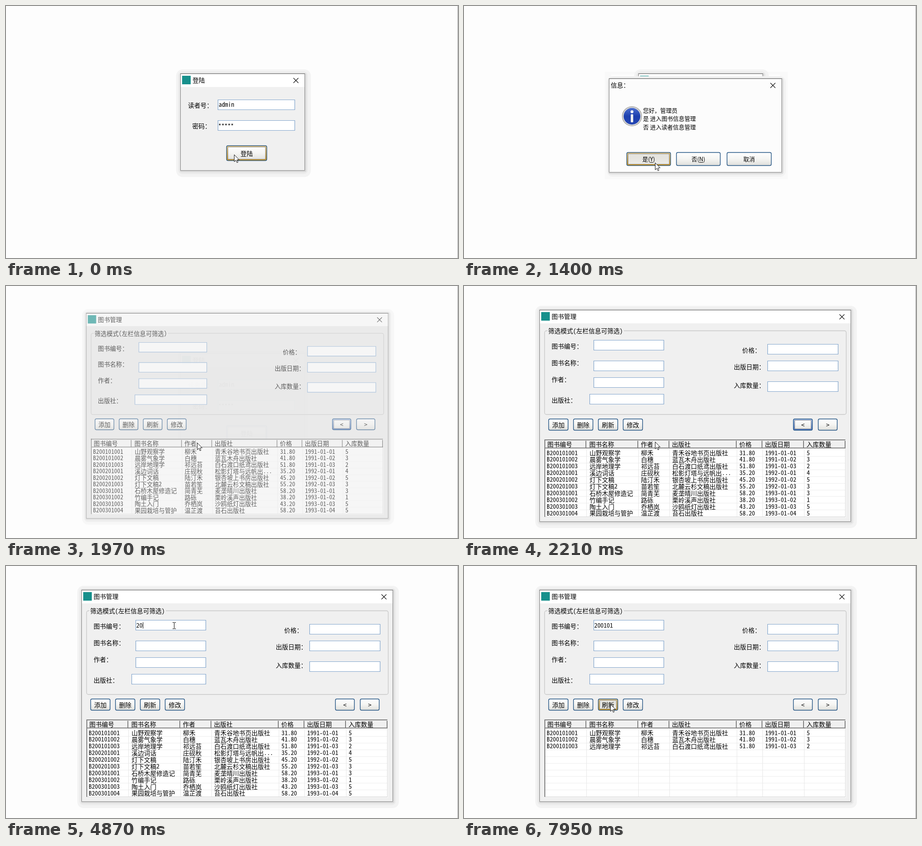
These frames come from a looping animation (1001 px wide and 560 px high, 8000 ms). An HTML page with a canvas:

```html
<!DOCTYPE html>
<html lang="zh-CN">
<head>
<meta charset="utf-8">
<title>图书管理</title>
<style>
  html, body { margin: 0; width: 100%; height: 100%; overflow: hidden; background: #fdfdfd; }
  canvas { display: block; }
</style>
</head>
<body>
<canvas id="stage" width="1001" height="560"></canvas>
<script>
const ctx = document.getElementById('stage').getContext('2d');
const LOOP = 8000;
const PAPER = '#fdfdfd';
const CJK = '"Noto Sans CJK SC", "Noto Sans CJK", sans-serif';
const MONO = '"Noto Sans Mono CJK SC", "Liberation Mono", monospace';
const SIZE = 13.75;

// Latin characters take half the width of a Chinese one
ctx.font = `100px ${MONO}`;
const LATIN_SIZE = SIZE / 2 / (ctx.measureText('0').width / 100);

const COLUMNS = [
  ['图书编号', 183, 270], ['图书名称', 278, 385], ['作者', 392, 454], ['出版社', 461, 603],
  ['价格', 610, 660], ['出版日期', 667, 752], ['入库数量', 759, 844]
];
const BOOKS = [
  'B200101001|山野观察学|柳禾|青禾谷地书页出版社|31.80|1991-01-01|5',
  'B200101002|晨雾气象学|白穗|蓝瓦木舟出版社|41.80|1991-01-02|3',
  'B200101003|远岸地理学|祁远苔|白石渡口纸鸢出版社|51.80|1991-01-03|2',
  'B200201001|溪边词话|庄砚秋|松影灯塔与远帆出...|35.20|1992-01-01|4',
  'B200201002|灯下文稿|陆汀禾|银杏坡上书房出版社|45.20|1992-01-02|5',
  'B200201003|灯下文稿2|苗若笙|北麓云杉文稿出版社|55.20|1992-01-03|3',
  'B200301001|石桥木屋修造记|简青芜|麦垄晴川出版社|58.20|1993-01-01|3',
  'B200301002|竹编手记|路砾|栗岭溪声出版社|38.20|1993-01-02|1',
  'B200301003|陶土入门|乔栖岚|沙鸥纸灯出版社|43.20|1993-01-03|5',
  'B200301004|果园栽培与管护|温芷渡|苔石出版社|58.20|1993-01-04|5'
].map(row => row.split('|'));

// time, x, y of the pointer
const POINTER = [
  [0, 505, 330], [550, 503, 331], [730, 492, 334], [850, 470, 340], [1000, 440, 345],
  [1120, 423, 348], [2090, 423, 346], [2330, 416, 333], [2450, 388, 225],
  [2600, 372, 126], [2870, 372, 130], [3300, 372, 127], [3580, 372, 132],
  [6650, 352, 189], [6770, 352, 205], [6890, 356, 235], [7020, 361, 270],
  [7140, 366, 300], [7270, 350, 306], [7400, 330, 307], [7520, 324, 307]
];
const KEY_TIMES = [4350, 4870, 5180, 5610, 6040, 6340];

function rect(x, y, w, h, color) {
  ctx.fillStyle = color;
  ctx.fillRect(x, y, w, h);
}

function frame(x, y, w, h, color, radius = 0, line = 1) {
  ctx.strokeStyle = color;
  ctx.lineWidth = line;
  ctx.beginPath();
  ctx.roundRect(x + .5, y + .5, w - 1, h - 1, radius);
  ctx.stroke();
}

function round(x, y, w, h, radius, color) {
  ctx.fillStyle = color;
  ctx.beginPath();
  ctx.roundRect(x, y, w, h, radius);
  ctx.fill();
}

function text(str, x, cy, size = SIZE, color = '#000') {
  ctx.font = `${size}px ${CJK}`;
  ctx.fillStyle = color;
  ctx.fillText(str, x, cy + size * .37);
}

function song(str, x, cy) {
  for (const run of str.match(/[\x00-\x7f]+|[^\x00-\x7f]+/g) || []) {
    const latin = run.charCodeAt(0) < 128;
    if (latin) {
      ctx.font = `${LATIN_SIZE}px ${MONO}`;
      ctx.fillStyle = '#000';
      ctx.fillText(run, x, cy + 4.5);
    } else {
      text(run, x, cy);
    }
    x += run.length * SIZE / (latin ? 2 : 1);
  }
}

function button(x, y, w, h, label, { hot, focus, pressed, size = SIZE } = {}) {
  const fill = ctx.createLinearGradient(0, y, 0, y + h);
  fill.addColorStop(0, pressed ? '#e3e2dc' : '#ffffff');
  fill.addColorStop(.5, pressed ? '#e6e5e0' : '#f5f5f3');
  fill.addColorStop(1, pressed ? '#efeeea' : '#dededa');
  round(x, y, w, h, 3, fill);
  if (hot || focus) {
    const glow = ctx.createLinearGradient(0, y, 0, y + h);
    glow.addColorStop(0, hot ? '#f6d38a' : '#b7cdf2');
    glow.addColorStop(1, hot ? '#d99a18' : '#4a74c4');
    frame(x + 1.5, y + 1.5, w - 3, h - 3, glow, 2, 2);
  }
  frame(x, y, w, h, '#1d4f80', 3, 1.4);
  if (focus) {
    ctx.setLineDash([1, 1]);
    frame(x + 3, y + 3, w - 6, h - 6, '#222');
    ctx.setLineDash([]);
  }
  ctx.font = `${size}px ${CJK}`;
  const left = x + (w - ctx.measureText(label).width) / 2;
  const cy = y + h / 2 + .5;
  text(label, left, cy, size);
  const key = label.search(/[A-Z]/);
  if (key > 0) {
    const start = left + ctx.measureText(label.slice(0, key)).width;
    rect(start, Math.round(cy + 6), ctx.measureText(label[key]).width, 1, '#000');
  }
}

function field(x, y, w) {
  rect(x, y, w, 23, '#fff');
  frame(x, y, w, 23, '#7fa3cb', 0, 1.2);
}

function win(x, y, w, h, title, { icon = true, body = '#f0f0f0', active = true, spread = 9 } = {}) {
  round(x - spread, y - spread, w + spread * 2 + 4, h + spread * 2 + 5, 14, '#f3f3f3');
  round(x - spread / 2, y - spread / 2, w + spread + 2, h + spread + 3, 9, '#ebebeb');
  round(x - 1, y - 1, w + 4, h + 4, 3, '#d9d9d9');
  rect(x, y, w, h, body);
  if (icon) {
    rect(x, y, w, 30, '#fff');
    rect(x + 4, y + 5, 19, 19, '#17908c');
  }
  frame(x, y, w, h, '#858585');
  rect(x, y, w, 1, '#5c5c5c');
  text(title, x + (icon ? 27 : 4), y + 15, SIZE, active ? '#000' : '#999');
  const cx = x + w - 20, cy = y + 15.5;
  ctx.strokeStyle = active ? '#111' : '#999';
  ctx.lineWidth = 1.1;
  ctx.beginPath();
  ctx.moveTo(cx - 5.5, cy - 5.5); ctx.lineTo(cx + 5.5, cy + 5.5);
  ctx.moveTo(cx + 5.5, cy - 5.5); ctx.lineTo(cx - 5.5, cy + 5.5);
  ctx.stroke();
}

function drawLogin(t) {
  const active = t < 400 || t >= 1670;
  win(386, 150, 276, 216, '登陆', { active });
  song('读者号：', 403, 221);
  song('密码：', 412.5, 267);
  field(469, 208, 171);
  field(469, 254, 171);
  song('admin', 471, 219);
  song('*****', 470, 267);
  button(488, 310, 90, 34, '登陆', { hot: t < 400, focus: true, pressed: t >= 280 && t < 400 });
}

function drawInfoIcon(x, y) {
  const disc = (r, color) => {
    ctx.fillStyle = color;
    ctx.beginPath();
    ctx.arc(x, y, r, 0, Math.PI * 2);
    ctx.fill();
  };
  disc(22, '#8e8e8e');
  disc(21, '#d4d4d4');
  const blue = ctx.createLinearGradient(0, y - 19, 0, y + 19);
  blue.addColorStop(0, '#4c6fd0');
  blue.addColorStop(.5, '#1c3fae');
  blue.addColorStop(1, '#2446b4');
  disc(18.5, blue);
  ctx.fillStyle = '#fff';
  ctx.beginPath();
  ctx.arc(x, y - 10, 3.2, 0, Math.PI * 2);
  ctx.fill();
  round(x - 2.7, y - 4.5, 5.4, 18, 1.5, '#f4f4f4');
}

function drawDialog(t, [px]) {
  win(321, 161, 383, 209, '信息：', { icon: false, body: '#fcfcfc', spread: 5 });
  drawInfoIcon(372, 245);
  ['您好，管理员', '是 进入图书信息管理', '否 进入读者信息管理']
    .forEach((line, i) => text(line, 396.5, 232 + i * 18.5, 12.7));
  const size = 12.7;
  const overYes = px < 458;
  button(360, 325, 98, 30, '是(Y)', { focus: true, hot: overYes, pressed: t >= 1400, size });
  button(470, 325, 98, 30, '否(N)', { hot: px >= 470, size });
  button(582, 325, 99, 30, '取消', { size });
}

function drawTable(rows) {
  rect(178, 341, 668, 174, '#fff');
  rect(178, 341, 667, 20, '#f0f0f0');
  rect(178, 341, 667, 2, '#808080');
  rect(178, 341, 2, 173, '#808080');
  rect(844, 342, 1, 172, '#d8d8d8');
  rect(178, 513, 667, 1, '#d8d8d8');
  rect(180, 359, 665, 2, '#858585');
  for (let i = 0; i < 10; i++) rect(180, Math.round(378 + i * 14.9), 664, 1, '#ededed');
  COLUMNS.forEach(([name, x, right], c) => {
    rect(right - 1, 344, 2, 16, '#7c7c7c');
    rect(right + 1, 344, 1, 15, '#fff');
    if (c < 6) rect(right + 1, 361, 1, 152, '#e6e6e6');
    song(name, c ? x - .5 : x + 1.5, 352);
    rows.forEach((row, r) => song(row[c], x, 371 + r * 14.93));
  });
}

function drawManager(t, [px, py]) {
  win(167, 53, 690, 471, '图书管理');
  frame(178, 99, 669, 187, '#c6c6c6', 4, 1.3);
  rect(185, 96, 169, 8, '#f0f0f0');
  song('筛选模式(左栏信息可筛选)', 186.5, 100);

  [['图书编号：', 194, 134], ['图书名称：', 194, 171], ['作者：', 194, 208], ['出版社：', 194, 254],
   ['价格：', 616, 143], ['出版日期：', 597.5, 180], ['入库数量：', 597.5, 221]]
    .forEach(label => song(...label));
  [[287, 120, 156], [287, 166, 156], [287, 203, 156], [278, 240, 165],
   [672, 129, 157], [672, 166, 157], [672, 212, 157]]
    .forEach(box => field(...box));

  const typed = '200101'.slice(0, KEY_TIMES.filter(k => t >= k).length);
  song(typed, 288.5, 132);
  if (t >= 3580 && t < 6650) rect(Math.round(289.5 + typed.length * SIZE / 2), 125, 1, 14, '#000');

  ['添加', '删除', '刷新', '修改'].forEach((label, i) => {
    const x = 187 + i * 55;
    const clicked = i === 2 && t >= 7520;
    button(x, 295, 44, 26, label, {
      hot: px >= x && px < x + 44 && py >= 295 && py < 321,
      focus: clicked,
      pressed: clicked
    });
  });
  button(729, 295, 43, 26, '<', { focus: t < 3580 });
  button(784, 295, 43, 26, '>');
  drawTable(t < 7800 ? BOOKS : BOOKS.filter(row => row[0].includes(typed)));
}

function drawArrow(x, y) {
  const outline = [[0, 0], [0, 15.5], [3.6, 12.2], [6, 17.6], [8.3, 16.6], [6, 11.4], [10.8, 11.2]];
  ctx.beginPath();
  outline.forEach(([dx, dy]) => ctx.lineTo(x + .5 + dx, y + .5 + dy));
  ctx.closePath();
  ctx.fillStyle = '#fff';
  ctx.fill();
  ctx.strokeStyle = '#111';
  ctx.lineWidth = 1;
  ctx.stroke();
}

function drawBeam(x, y) {
  rect(x, y - 6, 1, 13, '#000');
  for (const dy of [-7, 7]) {
    rect(x - 3, y + dy, 3, 1, '#000');
    rect(x + 1, y + dy, 3, 1, '#000');
  }
}

function faded(alpha, scale, draw) {
  ctx.save();
  ctx.globalAlpha = alpha;
  ctx.translate(512, 288);
  ctx.scale(scale, scale);
  ctx.translate(-512, -288);
  draw();
  ctx.restore();
}

function render(t) {
  const [, x, y] = POINTER.findLast(key => t >= key[0]);
  const pointer = [x, y];
  rect(0, 0, 1001, 560, PAPER);
  rect(1000, 0, 1, 560, '#a0a0a0');

  if (t < 2090) {
    if (t >= 400) {
      rect(312, 146, 405, 239, '#f9f9f9');
      rect(326, 152, 374, 229, PAPER);
    }
    drawLogin(t);
  }
  if (t >= 400 && t < 1670) {
    const alpha = t < 550 ? .6 : t < 1520 ? 1 : .4;
    faded(alpha, alpha < 1 ? .98 : 1, () => drawDialog(t, pointer));
  }
  if (t >= 1970) {
    const opening = t < 2090;
    faded(opening ? .6 : 1, opening ? .97 : 1, () => drawManager(t, pointer));
  }
  (t >= 2600 && t < 6650 ? drawBeam : drawArrow)(x, y);
}

const start = performance.now();
function tick() {
  render((performance.now() - start) % LOOP);
  requestAnimationFrame(tick);
}
tick();
</script>
</body>
</html>
```
